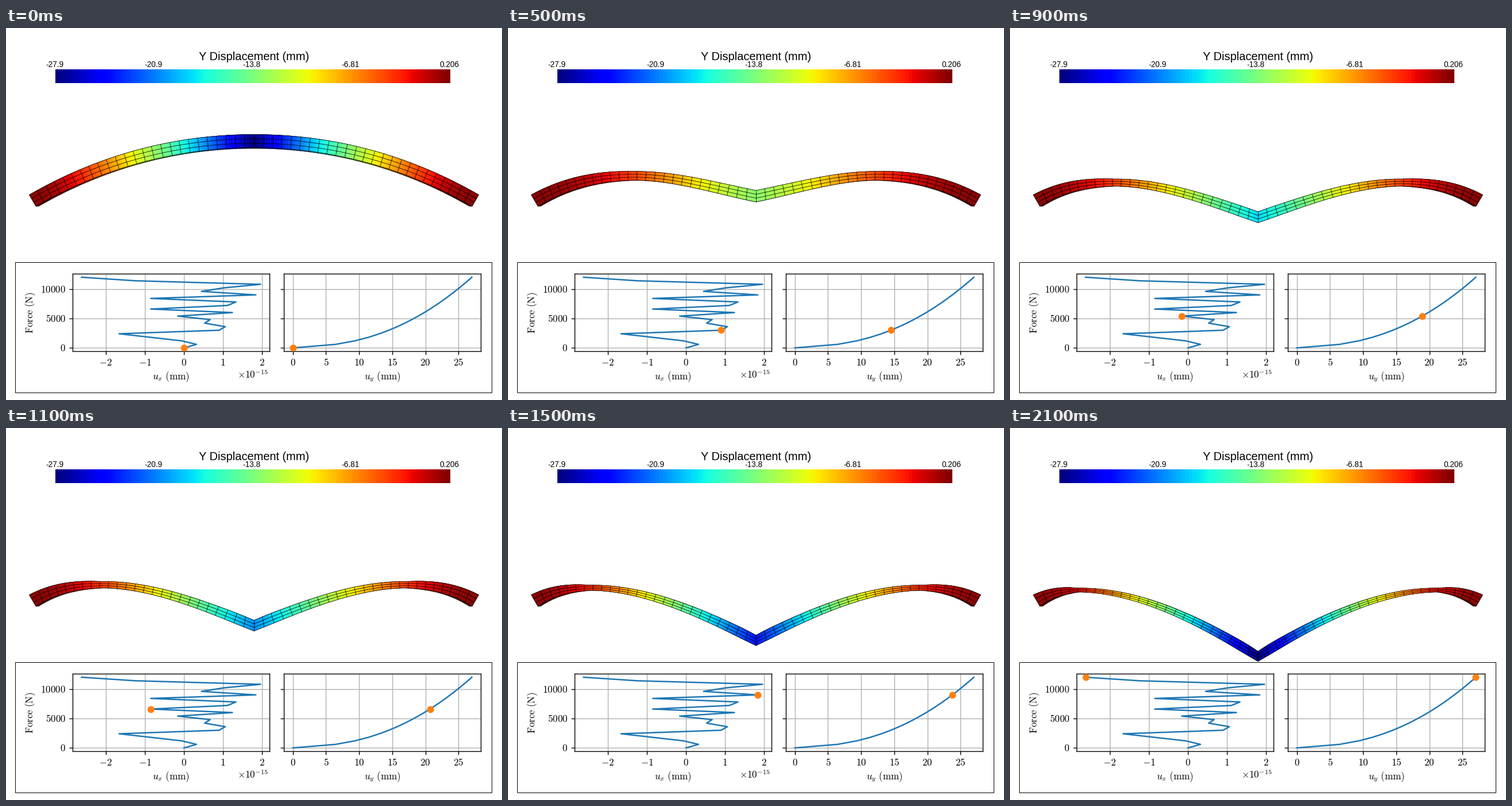
Write a matplotlib script that moves like this. It is 864x648 px and loops after 2200 ms.

```python
import numpy as np
import matplotlib.pyplot as plt
from matplotlib.animation import ArtistAnimation
from matplotlib.collections import LineCollection, PolyCollection
from matplotlib.patches import Rectangle

W, H = 864, 648
FRAMES, INTERVAL = 22, 100
STEPS = 20
plt.rcParams["mathtext.fontset"] = "cm"

# Recorded curves: a stiffening deflection and round-off noise
load = np.linspace(0, 1, STEPS + 1)
force = 12000 * load
safe = np.maximum(load, 1e-6)
uy = 27 * safe ** (.442 + .0018 / safe)
ux = np.array([0, .32, -.06, -.86, -1.66, .9, 1.06, .53, .67, -.16, 1.24,
               -.85, 1.11, 1.33, -.85, 1.84, .45, 1.02, 1.96, -1.24, -2.62])

# Arch geometry in pixels
CX, CY, R = 432, 966.5, 769.5
APEX = CY - R
HALF_ANGLE, THICK = .525, 23
COLS, ROWS, SUB = 25, 3, 4
VIEW = np.array([CX, 324])
DEPTH = .013
MAX_SAG = 201
V_MIN, V_MAX = -27.9, .206
JET = plt.get_cmap("jet")


def circle(x):
    return CY - np.sqrt(R**2 - (x - CX)**2)


def circle_slope(x):
    return (x - CX) / np.sqrt(R**2 - (x - CX)**2)


def hermite(x, xa, ya, ma, xb, yb, mb):
    w = xb - xa
    t = (x - xa) / w
    return ((2*t**3 - 3*t**2 + 1) * ya + (t**3 - 2*t**2 + t) * w * ma
            + (3*t**2 - 2*t**3) * yb + (t**3 - t**2) * w * mb)


def half_arch(s):
    """Middle line, slope, thickness and sag of the left half at load s."""
    q = s**.52 * (1 - np.exp(-16 * s))  # relative sag of the middle
    r = q**.54                          # how far the crest has moved out
    xc = CX - 1 - 313 * r
    yc = APEX + 85.2 * (r + 3*r**2 - 2*r**3) / 2
    dc, mc = yc - circle(xc), -circle_slope(xc)
    mm = max(0, .8 * q - .18)

    x = CX - R * np.sin(np.linspace(HALF_ANGLE, 0, COLS * SUB + 1))
    sag = np.where(x < xc,
                   hermite(x, x[0], 0, 0, xc, dc, mc),
                   hermite(x, xc, dc, mc, CX, MAX_SAG * q, mm))
    y = circle(x) + sag
    slope = np.gradient(y, x) * np.clip((CX - x) / 40, 0, 1)
    slope[0] = -np.tan(HALF_ANGLE)
    thick = THICK - q * np.interp(x, [x[0], xc, CX], [0, 16.3, 6.2])
    return x, y, slope, thick, sag


def mirror(a, flip=lambda v: v):
    return np.concatenate([a, flip(a[-2::-1])])


def quads(a, b):
    return np.stack([a[:-1], a[1:], b[1:], b[:-1]], axis=1)


def recede(p):
    return VIEW + (p - VIEW) * (1 - DEPTH)


def beam(s):
    x, y, slope, thick, sag = half_arch(s)
    if s == 0:
        sag = half_arch(1)[-1]  # the rest pose keeps the last colours
    x = mirror(x, lambda v: 2 * CX - v)
    y, thick, sag = mirror(y), mirror(thick), mirror(sag)
    slope = mirror(slope, np.negative)

    mid = np.column_stack([x, y])
    normal = np.column_stack([slope, -np.ones_like(x)])
    normal *= (thick / 2 / np.hypot(slope, 1))[:, None]
    top, bot = mid + normal, mid - normal

    value = (sag[1:] + sag[:-1]) / 2 / MAX_SAG * V_MIN
    front = JET((value - V_MIN) / (V_MAX - V_MIN))
    dark = front * [.3, .3, .3, 1]

    sides = np.concatenate([quads(top, recede(top)), quads(bot, recede(bot))])
    side_fill = PolyCollection(sides, facecolors=np.tile(dark, (2, 1)),
                               edgecolors="face", linewidths=.2, zorder=1)
    fill = PolyCollection(quads(top, bot), facecolors=front,
                          edgecolors="face", linewidths=.3, zorder=3)
    rows = [top + (bot - top) * j / ROWS for j in range(ROWS + 1)]
    cols = list(np.stack([top[::SUB], bot[::SUB]], axis=1))
    grid = LineCollection(rows + cols, colors="k", linewidths=.75, zorder=4)
    return [stage.add_collection(c, autolim=False)
            for c in (side_fill, fill, grid)]


def label(x, y, s, size=17, ha="center", va="baseline", **kw):
    stage.text(x, y, s, fontsize=size, ha=ha, va=va, zorder=8, **kw)


def chart(x0, xticks, u):
    y0, w, h = 428, 343, 135.4
    ax = fig.add_axes([x0 / W, 1 - (y0 + h) / H, w / W, h / H])
    ax.plot(u, force, color="tab:blue", lw=2.5)
    ax.set_xticks(xticks, [""] * len(xticks))
    ax.set_yticks([0, 5000, 10000], [""] * 3)
    ax.tick_params(length=6, width=1.4)
    ax.grid(color="#b0b0b0", lw=1.4)
    for spine in ax.spines.values():
        spine.set_linewidth(1.4)
    lo, hi = ax.get_xlim()
    for v in xticks:
        label(x0 + (v - lo) / (hi - lo) * w, 588, f"${v}$")
    return ax


fig = plt.figure(figsize=(W / 72, H / 72), dpi=72, facecolor="white")
stage = fig.add_axes([0, 0, 1, 1])
stage.axis("off")

# Colour bar
stage.imshow(np.linspace(0, 1, 128)[None], cmap=JET, aspect="auto",
             extent=(86, 774, 96, 72), interpolation="nearest")
stage.set(xlim=(0, W), ylim=(H, 0), autoscale_on=False)
label(432, 56.5, "Y Displacement (mm)", 20, family="Liberation Sans")
for i, s in enumerate(["-27.9", "-20.9", "-13.8", "-6.81", "0.206"]):
    label(84.5 + 171.9 * i, 68.5, s, 13.6, family="Liberation Sans")

# Chart panel
stage.add_patch(Rectangle((16, 408), 830, 227, fc="white", ec="k",
                          lw=1, zorder=6))
left = chart(116, range(-2, 3), ux)
right = chart(484, range(0, 26, 5), uy)
for v in (0, 5000, 10000):
    label(104, 563 - v * .01023, f"${v}$", ha="right")
label(287, 612, r"$u_x\ \mathrm{(mm)}$")
label(656, 612, r"$u_y\ \mathrm{(mm)}$")
label(456.5, 610, r"$\times10^{-15}$", ha="right")
label(54.5, 495.5, r"$\mathrm{Force\ (N)}$", ha="right", va="center",
      rotation=90)


def dot(ax, u, step):
    return ax.plot(u[step], force[step], "o", color="tab:orange", ms=10.3,
                   mew=1.7, zorder=5)


scenes = []
for k in range(FRAMES):
    step = min(k, STEPS)
    scenes.append(beam(load[step]) + dot(left, ux, step)
                  + dot(right, uy, step))

anim = ArtistAnimation(fig, scenes, interval=INTERVAL, repeat=True,
                       repeat_delay=0)
plt.show()
```
